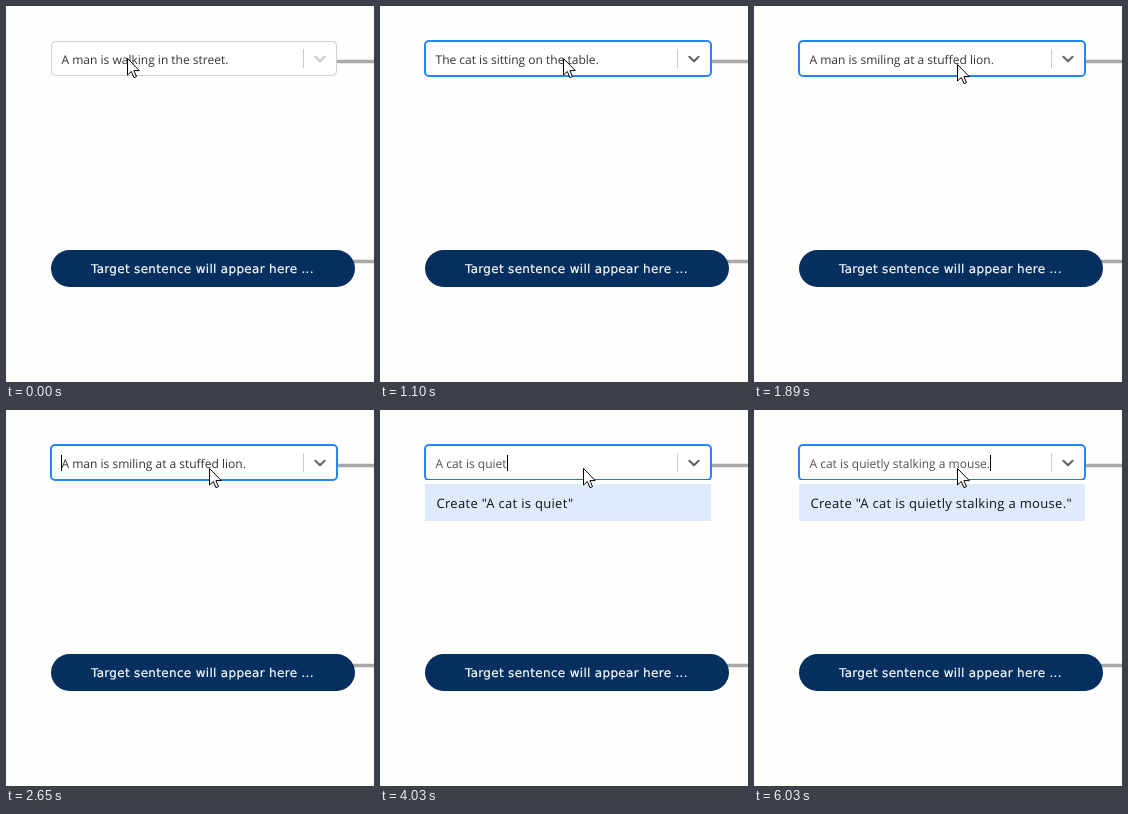
Recreate the animation shown at these times as an HTML page. Size 368 by 376 pixels, loop 6060 ms.

```html
<!DOCTYPE html>
<html lang="en">
<head>
<meta charset="utf-8">
<title>Sentence picker</title>
<style>
  html, body { margin: 0; width: 100%; height: 100%; overflow: hidden; background: #fefefc; }
  svg { display: block; }
  text { white-space: pre; text-rendering: geometricPrecision; font-family: "Open Sans", "Noto Sans", sans-serif; }
  .field { font-size: 12px; }
  .option { font-size: 13px; letter-spacing: .31px; fill: #111; }
  .option.selected { fill: #fff; stroke: #fff; stroke-width: .4px; }
  .pill { font: 12px "DejaVu Sans", sans-serif; letter-spacing: .31px; fill: #fff; stroke: #fff; stroke-width: .2px; }
</style>
</head>
<body>
<svg id="stage" width="368" height="376" viewBox="0 0 368 376">
  <defs><clipPath id="menuClip"><rect x="44" y="69" width="288" height="271"/></clipPath></defs>
  <rect width="368" height="376" fill="#fefefc"/>
  <path d="M330 55.5H368M340 255.5H368" stroke="#a9a9a9" stroke-width="3.6"/>
  <rect x="45" y="244" width="304" height="37" rx="18.5" fill="#052f5f"/>
  <text class="pill" x="85" y="267">Target sentence will appear here ...</text>

  <rect id="control" fill="#fff"/>
  <rect x="297" y="43" width="1" height="19" fill="#ccc"/>
  <path id="chevron" d="M309.4 50.8L314 55.2L318.6 50.8" fill="none" stroke-width="2.2" stroke-linecap="round" stroke-linejoin="round"/>
  <text id="field" class="field" x="55.5" y="58"></text>
  <rect id="caret" y="45" width="1" height="16" fill="#000"/>

  <g id="menu" clip-path="url(#menuClip)">
    <rect x="45" y="69" width="286" height="1" fill="#000" opacity=".1"/>
    <rect x="44" y="70" width="288" height="2" fill="#fff"/>
    <rect id="menuBack" x="45" y="70" width="286" fill="#fff"/>
    <g id="options"></g>
    <g id="scrollbar">
      <rect x="314" y="70" width="17" height="270" fill="#f1f1f1"/>
      <rect x="316" y="87" width="13" height="101" fill="#c1c1c1"/>
      <path d="M319 81H326L322.5 77Z" fill="#a3a3a3"/>
      <path d="M319 329H326L322.5 333Z" fill="#505050"/>
    </g>
    <g id="create">
      <rect x="45" y="74" width="286" height="37" fill="#deebff"/>
      <text id="createText" class="option" x="56.5" y="98"></text>
    </g>
  </g>
  <path id="cursor" d="M0 0V16.5L3.8 13L6.5 19.2L9 18.1L6.4 12.1H11.8Z" fill="#fff" stroke="#000"/>
</svg>
<script>
const LOOP = 6060;
const ROW = 37.5;
const MENU_TOP = 74;
const LION = 5;
const sentences = [
  ["A man is walking in the street."],
  ["The dog is running in the park."],
  ["The cat is sitting on the table."],
  ["The computer is sitting on the table."],
  ["The woman is brushing her teeth."],
  ["A man is smiling at a stuffed lion."],
  ["A man in a blue shirt is standing on a", "ladder cleaning a window."]
];
const typed = "A cat is quietly stalking a mouse.";
const keyTimes = [
  2860, 3000, 3170, 3240, 3300, 3370, 3440, 3510, 3580, 3650, 3720, 3820,
  3930, 4030, 4170, 4340, 4410, 4480, 4550, 4620, 4720, 4820, 4960, 5050,
  5130, 5220, 5300, 5390, 5480, 5620, 5690, 5750, 5890, 6030
];
// Each move: start, end, target x, target y
const moves = [
  [60, 580, 165, 178],
  [890, 1090, 184, 52],
  [1130, 1440, 169, 268],
  [1560, 1890, 204, 58]
];

const $ = id => document.getElementById(id);
const within = (t, from, to) => t >= from && t < to;
const show = (node, visible) => node.setAttribute("display", visible ? "inline" : "none");

function set(node, attrs) {
  for (const key in attrs) node.setAttribute(key, attrs[key]);
  return node;
}

function add(parent, tag, attrs) {
  const node = document.createElementNS("http://www.w3.org/2000/svg", tag);
  return parent.appendChild(set(node, attrs));
}

const rows = sentences.map((lines, i) => {
  const top = MENU_TOP + i * ROW;
  const y = Math.floor(top);
  const back = add($("options"), "rect", { x: 45, y, width: 269, height: lines.length > 1 ? 60 : 37 });
  const labels = lines.map((line, n) => {
    const label = add($("options"), "text", { class: "option", x: 56.5, y: y + 24 + n * 20 });
    label.textContent = line;
    return label;
  });
  return { back, labels };
});

function cursorAt(t) {
  let x = 122, y = 52;
  for (const [start, end, toX, toY] of moves) {
    if (t < start) break;
    const p = Math.min(1, (t - start) / (end - start));
    const eased = p * p * (3 - 2 * p);
    x += (toX - x) * eased;
    y += (toY - y) * eased;
  }
  return [Math.round(x), Math.round(y)];
}

function drawControl(focused) {
  const grow = focused ? 1 : 0;
  set($("control"), {
    x: 45.5 - grow / 2, y: 35.5 - grow / 2,
    width: 285 + grow, height: 34 + grow, rx: 4,
    stroke: focused ? "#2684ff" : "#ccc", "stroke-width": 1 + grow
  });
  $("chevron").setAttribute("stroke", focused ? "#666" : "#ccc");
}

function drawOptions(selected, hovered, pressed) {
  rows.forEach(({ back, labels }, i) => {
    const isSelected = i === selected;
    const active = pressed ? "#b2d4ff" : "#deebff";
    back.setAttribute("fill", isSelected ? "#2684ff" : i === hovered ? active : "#fff");
    labels.forEach(label => label.classList.toggle("selected", isSelected));
  });
}

function render(t) {
  const [x, y] = cursorAt(t);
  const text = typed.slice(0, keyTimes.filter(time => time <= t).length);
  const selected = t < 750 ? 0 : t < 1550 ? 2 : LION;
  const creating = text.length > 2;
  const listing = within(t, 30, 750) || within(t, 1130, 1550) || within(t, 2440, 2635) || (text && !creating);
  const pressed = within(t, 720, 750) || within(t, 1510, 1550);
  const hovered = text ? 0 : y >= MENU_TOP ? Math.floor((y - MENU_TOP) / ROW) : -1;

  drawControl(t >= 30);
  const field = $("field");
  field.textContent = text || sentences[selected][0];
  field.setAttribute("fill", text ? "#505050" : "#333");
  show($("caret"), t >= 2620);
  $("caret").setAttribute("x", text ? Math.round(55.5 + field.getComputedTextLength()) : 55);

  show($("menu"), listing || creating);
  show($("options"), listing);
  show($("scrollbar"), listing);
  show($("create"), creating);
  $("menuBack").setAttribute("height", creating ? 45 : 270);
  $("createText").textContent = `Create "${text}"`;
  drawOptions(selected, hovered, pressed);

  $("cursor").setAttribute("transform", `translate(${x - 0.5} ${y + 0.5})`);
}

const start = performance.now();
function tick() {
  render((performance.now() - start) % LOOP);
  requestAnimationFrame(tick);
}
tick();
</script>
</body>
</html>
```
